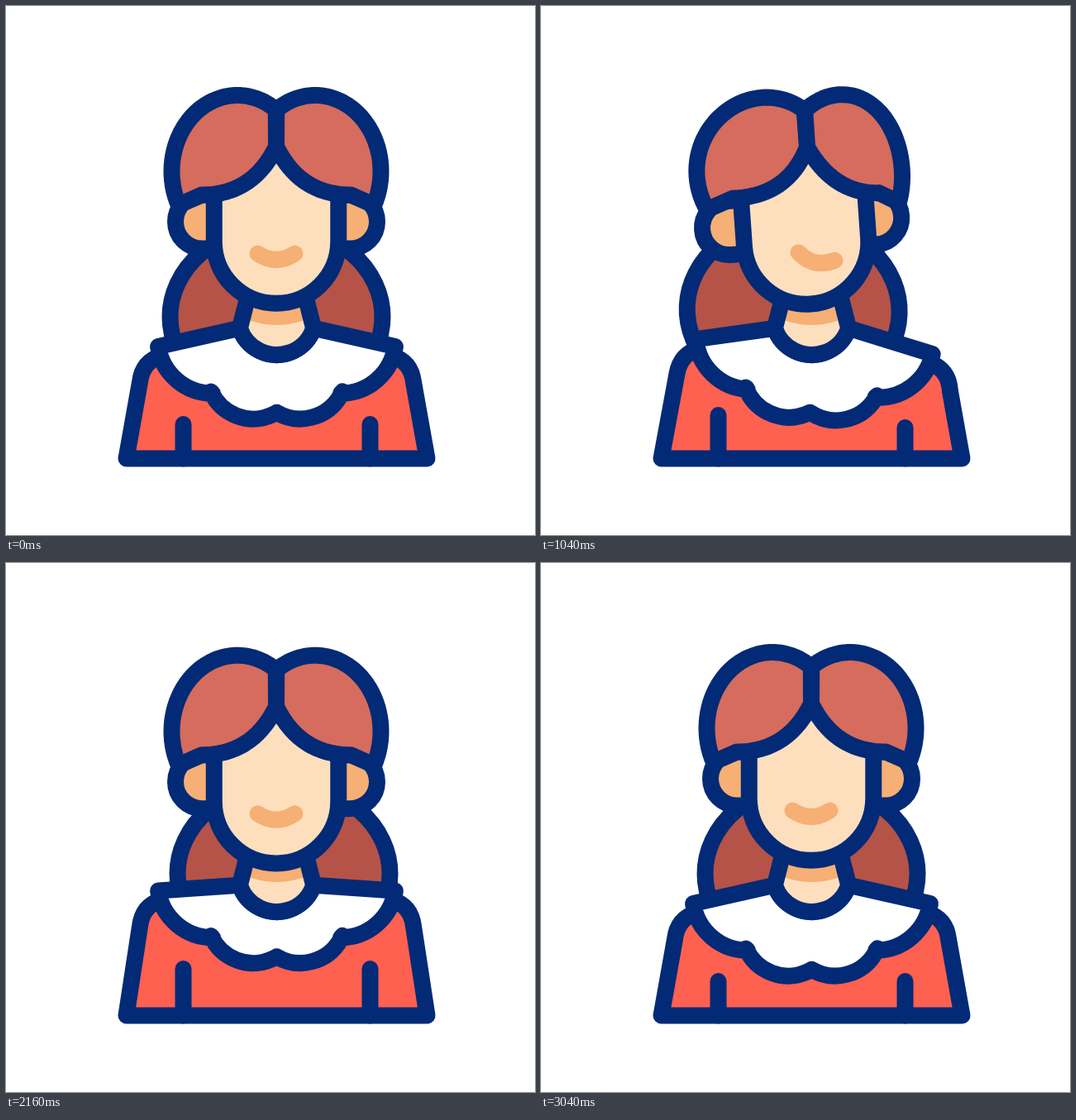
Animation, 640 px wide and 640 px high, one loop 3100 ms. Source, as an HTML page with a canvas:

```html
<!DOCTYPE html>
<html lang="en">
<head>
<meta charset="utf-8">
<title>Woman shrugging</title>
<style>
html, body { margin: 0; width: 100%; height: 100%; overflow: hidden; background: #fff; }
canvas { display: block; width: 640px; height: 640px; }
</style>
</head>
<body>
<canvas id="stage" width="640" height="640"></canvas>
<script>
const ctx = document.getElementById('stage').getContext('2d');
const LOOP = 3100, STEP = 20, MID = 327.5;
const NAVY = '#032a76', SKIN = '#fddfbe', PEACH = '#f6af74', RED = '#ff6151';
const HAIR = '#d56c5d', DARK = '#b55348';
const { PI, cos, sin } = Math;

// Cubic timing curve between two moments
function ease(t, from, to, [x1, y1, x2, y2]) {
  const x = (t - from) / (to - from);
  if (x <= 0) return 0;
  if (x >= 1) return 1;
  const at = (s, a, b) => 3 * (1 - s) * (1 - s) * s * a + 3 * (1 - s) * s * s * b + s * s * s;
  let lo = 0, hi = 1;
  for (let i = 0; i < 30; i++) {
    const mid = (lo + hi) / 2;
    if (at(mid, x1, x2) < x) lo = mid; else hi = mid;
  }
  return at(lo, y1, y2);
}

const SETTLE = [0.33, 0, 0, 1], GATHER = [1, 0, 0.67, 1], DROP = [0.1, 0.45, 0, 1];

function pose(t) {
  const down = ease(t, 2160, 3040, DROP);
  const lift = ease(t, 1120, 2160, GATHER);
  const back = ease(t, 1250, 2160, GATHER);
  return {
    head: ease(t, 100, 1100, SETTLE) * (1 - back),
    lean: ease(t, 100, 1140, SETTLE) * (1 - lift),
    sway: ease(t, 140, 1180, SETTLE) * (1 - back),
    shrug: lift * (1 - down),
    nod: back * (1 - down)
  };
}

function paint(fill, stroke = NAVY) {
  if (fill) { ctx.fillStyle = fill; ctx.fill(); }
  if (stroke) { ctx.strokeStyle = stroke; ctx.stroke(); }
}

function backHair(p) {
  const x = 327 - 22 * p.sway + 9 * p.shrug;
  ctx.beginPath();
  ctx.ellipse(x, 376 - 8 * p.sway, 128.5, 109, 0.04 * p.sway, 0, 2 * PI);
  paint(DARK);
}

function body(p) {
  const a = 0.063 * p.lean, base = 547.5;
  // Mirrored point that leans and lifts with the shoulders
  const at = (side, dx, y) => [
    MID + side * dx * cos(a) - (y - 490) * sin(a),
    490 + (y - 490) * cos(a) + side * dx * sin(a) - 15.5 * p.shrug
  ];
  ctx.beginPath();
  ctx.moveTo(MID - 182, base);
  ctx.lineTo(...at(-1, 165.5, 455));
  ctx.quadraticCurveTo(...at(-1, 162.5, 430), ...at(-1, 139.5, 423));
  ctx.lineTo(...at(1, 139.5, 423));
  ctx.quadraticCurveTo(...at(1, 162.5, 430), ...at(1, 165.5, 455));
  ctx.lineTo(MID + 182, base);
  ctx.closePath();
  paint(RED);
  for (const side of [-1, 1]) {
    ctx.beginPath();
    ctx.moveTo(MID + side * 113, base);
    ctx.lineTo(MID + side * 113, 506 + (side * 7.5 - 3.5) * p.lean - 15 * p.shrug);
    paint();
  }
}

const neckline = (from, to, ccw) => ctx.arc(MID, 375, 47, from, to, ccw);

function collar(p) {
  ctx.beginPath();
  ctx.save();
  ctx.translate(MID, 460 - 15.5 * p.shrug);
  ctx.rotate(0.063 * p.lean);
  ctx.translate(0, -460);
  ctx.arc(-77.5, 402, 66.7, 2.99, PI / 2, true);
  ctx.arc(-28.5, 443.5, 56, 2.72, 1.04, true);
  ctx.arc(28.5, 443.5, 56, PI - 1.04, PI - 2.72, true);
  ctx.arc(77.5, 402, 66.7, PI / 2, PI - 2.99, true);
  ctx.restore();
  neckline(0.32, PI - 0.32);
  ctx.closePath();
  paint('#fff');
}

function neck() {
  const outline = () => {
    ctx.beginPath();
    ctx.moveTo(MID - 35, 352);
    neckline(PI - 0.32, 0.32, true);
    ctx.lineTo(MID + 35, 352);
  };
  outline();
  paint(SKIN, null);
  ctx.beginPath();
  ctx.moveTo(MID - 35, 352);
  ctx.lineTo(MID - 41, 377);
  ctx.quadraticCurveTo(MID, 395, MID + 41, 377);
  ctx.lineTo(MID + 35, 352);
  paint(PEACH, null);
  outline();
  paint();
}

// Head parts are placed around the centre of the jaw
function ear(side, shift) {
  ctx.save();
  ctx.translate(shift, 0);
  ctx.scale(side, 1);
  ctx.beginPath();
  ctx.moveTo(75, -56);
  ctx.arc(89.5, -23.5, 32.5, -PI / 2, PI / 2);
  ctx.lineTo(75, 9);
  paint(PEACH);
  ctx.restore();
}

function face(k) {
  const jaw = () => {
    ctx.beginPath();
    ctx.moveTo(-75.25, -54);
    ctx.arc(0, 0, 75.25, PI, 0, true);
    ctx.lineTo(75.25, -54);
  };
  jaw();
  ctx.lineTo(9 * k, -114);
  paint(SKIN, null);
  jaw();
  paint();
}

// A lobe is most of an ellipse, closed below by a sweep up to the parting
function lobe(side, k) {
  const add = (x, y) => {
    const u = side * x / 126;
    ctx.lineTo(side * x + k * (11.5 * (1 - u * u) - 2.4 - 2.4 * u), y + 4 * u * k);
  };
  const N = 40;
  ctx.beginPath();
  for (let i = 0; i <= N; i++) {
    const a = -2.2 + 2.66 * i / N;
    add(47 + 79.5 * cos(a), -84.5 + 92 * sin(a));
  }
  for (let i = 0; i <= N; i++) {
    const s = i / N, r = 1 - s;
    add(90 * r * r + 56.8 * r * s, -56 * r * r - 112 * r * s - 114.5 * s * s);
  }
  ctx.closePath();
  paint(HAIR);
}

function head(p) {
  const k = p.head, nod = 3.7 * p.nod;
  ctx.save();
  ctx.translate(327 - 6 * k, 284.5 + k + nod);
  ctx.rotate(-0.07 * k);
  ear(-1, -2.6 * k);
  ear(1, -5 * k);
  face(k);
  lobe(-1, k);
  lobe(1, k);
  ctx.restore();

  ctx.save();
  ctx.translate(327 + 6.5 * k, 299.5 + 3.5 * k + nod);
  ctx.rotate(0.218 * k);
  ctx.beginPath();
  ctx.moveTo(-22.5, 0);
  ctx.quadraticCurveTo(0, 15, 22.5, 0);
  paint(null, PEACH);
  ctx.restore();
}

function draw(t) {
  const p = pose(t);
  ctx.fillStyle = '#fff';
  ctx.fillRect(0, 0, 640, 640);
  ctx.lineWidth = 20;
  ctx.lineCap = ctx.lineJoin = 'round';
  backHair(p);
  body(p);
  collar(p);
  neck();
  head(p);
}

const start = performance.now();
function tick() {
  const t = (performance.now() - start) % LOOP;
  draw(Math.floor(t / STEP) * STEP);
  requestAnimationFrame(tick);
}
tick();
</script>
</body>
</html>
```
